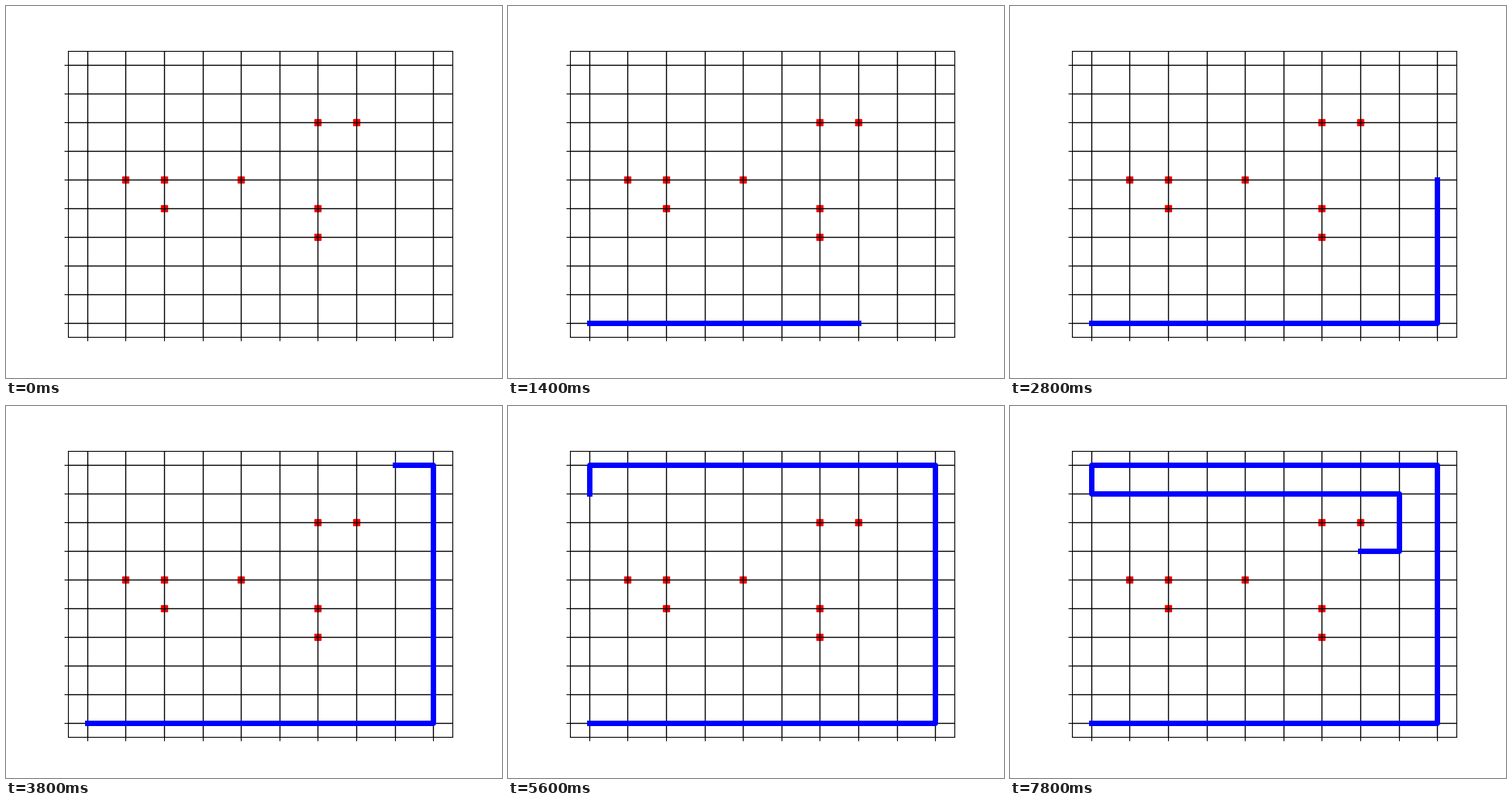
Animation, 640 px wide and 480 px high, one loop 8000 ms. Source, as a matplotlib script:

```python
import matplotlib.pyplot as plt
import numpy as np
from matplotlib.animation import FuncAnimation

INTERVAL = 200
SIZE = 10
LAST = SIZE - 1

# Obstacle columns, keyed by row
obstacles = {7: (6, 7), 5: (1, 2, 4), 4: (2, 6), 3: (6,)}

# The walker moves one cell per frame between these turning points
corners = np.array([(0, 0), (LAST, 0), (LAST, LAST), (0, LAST),
                    (0, 8), (8, 8), (8, 6), (7, 6)])
lengths = np.abs(np.diff(corners, axis=0)).sum(axis=1)
reached = np.concatenate(([0], np.cumsum(lengths)))
frames = int(reached[-1]) + 1

fig, ax = plt.subplots(figsize=(6.4, 4.8), dpi=100)
ax.set(xlim=(-0.5, SIZE - 0.5), ylim=(-0.5, SIZE - 0.5),
       xticks=range(SIZE), yticks=range(SIZE))
ax.tick_params(labelbottom=False, labelleft=False)
ax.grid(color="black", linewidth=1)

for row, cols in obstacles.items():
    ax.plot(cols, [row] * len(cols), "s", color="red", markersize=6, zorder=1)
trail, = ax.plot([], [], color="blue", linewidth=5)


def update(frame):
    steps = np.arange(frame + 1)
    trail.set_data(*(np.interp(steps, reached, axis) for axis in corners.T))
    return trail,


anim = FuncAnimation(fig, update, frames=frames, interval=INTERVAL,
                     repeat=True, repeat_delay=0)
plt.show()
```
